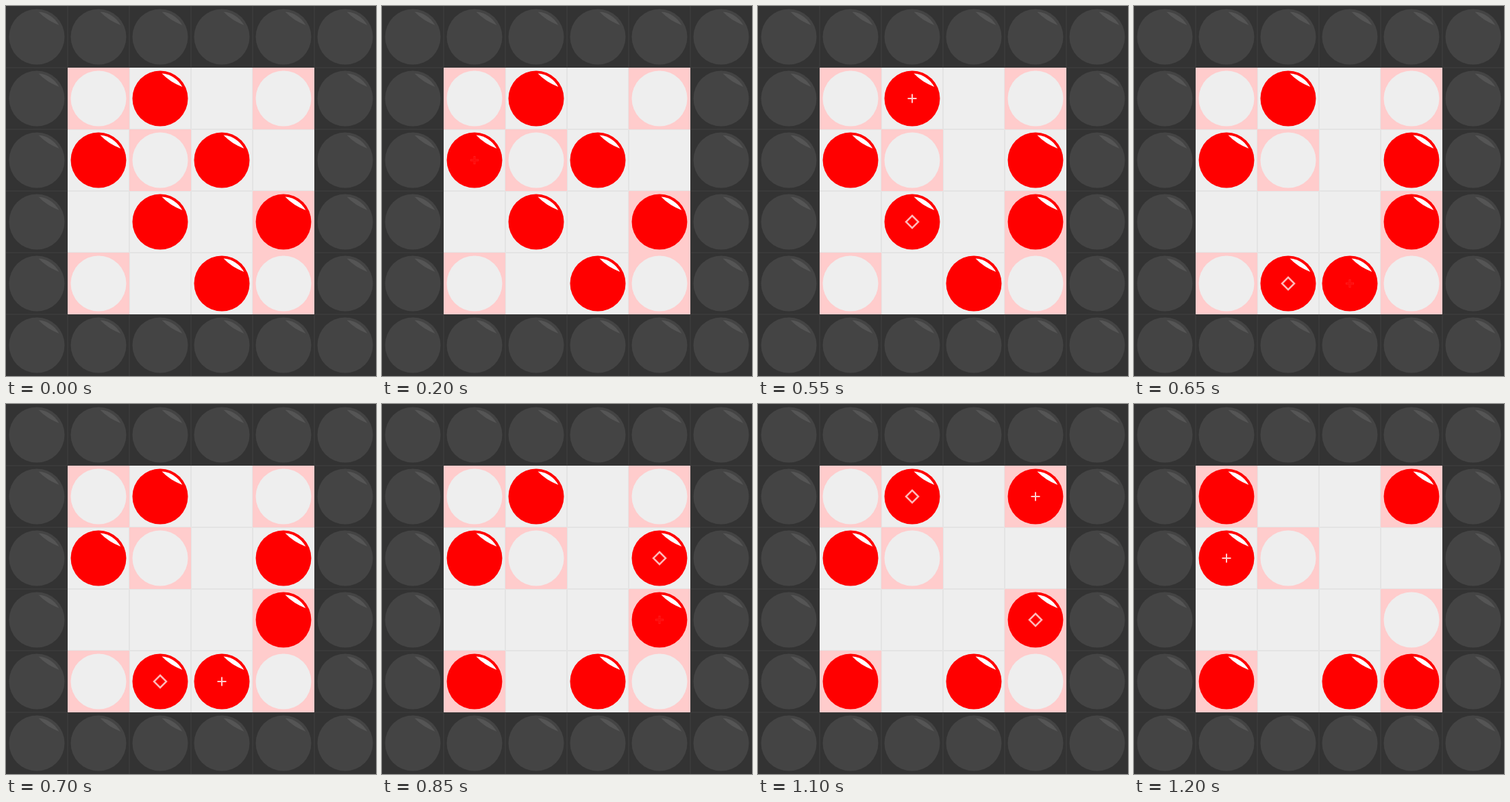
Animation, 540 px wide and 540 px high, one loop 1.35 s. Source, as an HTML page with a canvas:

```html
<!DOCTYPE html>
<html lang="en">
<head>
<meta charset="utf-8">
<title>Ball puzzle</title>
<style>
html, body { margin: 0; width: 100%; height: 100%; overflow: hidden; background: #333; }
canvas { display: block; width: 540px; height: 540px; }
</style>
</head>
<body>
<canvas id="board" width="540" height="540"></canvas>
<script>
const ctx = document.getElementById('board').getContext('2d');
const CELL = 90, LOOP = 1350;
const GOALS = ['00', '30', '11', '32', '03', '33'];
const START = ['10', '01', '21', '12', '32', '23'];

// Moves: time, then pairs of cells (column, row) from > to
const MOVES = [
  [450, '21>31'],
  [600, '12>13'],
  [750, '13>03'],
  [900, '31>30'],
  [1150, '10>00', '32>33']
];

// Markers from each time on: "+" bright, "." faint, "x" on empty floor, "d" pushed ball
const MARKS = [
  [0],
  [200, '.01'],
  [400, '+01', 'x02', 'd21'],
  [450],
  [500, '.10', 'd12'],
  [550, '+10', 'd12'],
  [600],
  [650, '.23', 'd13'],
  [700, '+23', 'd13'],
  [750, '+23'],
  [800],
  [850, '.32', 'd31'],
  [900, '.32'],
  [950],
  [1000, '.30', 'd10', 'd32'],
  [1100, '+30', 'd10', 'd32'],
  [1150],
  [1200, '+01']
];

const center = c => [(+c[0] + 1.5) * CELL, (+c[1] + 1.5) * CELL];

function disc(x, y, color) {
  ctx.fillStyle = color;
  ctx.beginPath();
  ctx.arc(x, y, 40.5, 0, Math.PI * 2);
  ctx.fill();
}

function ball(x, y, color, shine) {
  disc(x, y, color);
  ctx.fillStyle = shine;
  ctx.beginPath();
  ctx.arc(x, y, 36.5, Math.atan2(-36.4, 2.5), Math.atan2(-17, 32.3));
  ctx.quadraticCurveTo(x + 14, y - 24, x + 2.5, y - 36.4);
  ctx.fill();
}

function grid(from, to, color) {
  ctx.fillStyle = color;
  for (let p = from + CELL; p < to; p += CELL) {
    ctx.fillRect(p - 1, from, 2, to - from);
    ctx.fillRect(from, p - 1, to - from, 2);
  }
}

function plus(x, y, r, width, color) {
  ctx.strokeStyle = color;
  ctx.lineWidth = width;
  ctx.beginPath();
  ctx.moveTo(x - r, y);
  ctx.lineTo(x + r, y);
  ctx.moveTo(x, y - r);
  ctx.lineTo(x, y + r);
  ctx.stroke();
}

const marks = {
  '+': (x, y) => plus(x, y, 6.5, 2, '#ffcccc'),
  'x': (x, y) => plus(x, y, 10, 2.2, '#ff0000'),
  '.': (x, y) => {
    ctx.setLineDash([1, 1]);
    plus(x, y, 5.5, 3, '#ff3838');
    ctx.setLineDash([]);
    plus(x, y, 5, 1, '#ff0000');
  },
  'd': (x, y) => {
    ctx.strokeStyle = '#ffb8b8';
    ctx.lineWidth = 2.5;
    ctx.beginPath();
    ctx.moveTo(x, y - 9);
    ctx.lineTo(x + 9, y);
    ctx.lineTo(x, y + 9);
    ctx.lineTo(x - 9, y);
    ctx.closePath();
    ctx.stroke();
  }
};

function drawBoard() {
  ctx.fillStyle = '#333';
  ctx.fillRect(0, 0, 540, 540);
  grid(0, 540, '#3a3a3a');
  for (let i = 0; i < 6; i++) {
    for (let j = 0; j < 6; j++) {
      if (i % 5 && j % 5) continue;
      ball((i + 0.5) * CELL, (j + 0.5) * CELL, '#444', '#555');
    }
  }
  ctx.fillStyle = '#eee';
  ctx.fillRect(90, 90, 360, 360);
  grid(90, 450, '#e4e4e4');
  for (const c of GOALS) {
    const [x, y] = center(c);
    ctx.fillStyle = '#ffcccc';
    ctx.fillRect(x - 45, y - 45, CELL, CELL);
    disc(x, y, '#eee');
  }
}

function ballsAt(t) {
  const cells = START.slice();
  for (const [at, ...steps] of MOVES) {
    if (t < at) break;
    for (const step of steps) {
      const [from, to] = step.split('>');
      cells[cells.indexOf(from)] = to;
    }
  }
  return cells;
}

function draw(t) {
  drawBoard();
  for (const c of ballsAt(t)) ball(...center(c), '#ff0000', '#fff');
  const [, ...list] = MARKS.filter(m => m[0] <= t).pop();
  for (const m of list) marks[m[0]](...center(m.slice(1)));
}

const begin = performance.now();
function tick() {
  draw((performance.now() - begin) % LOOP);
  requestAnimationFrame(tick);
}
tick();
</script>
</body>
</html>
```
